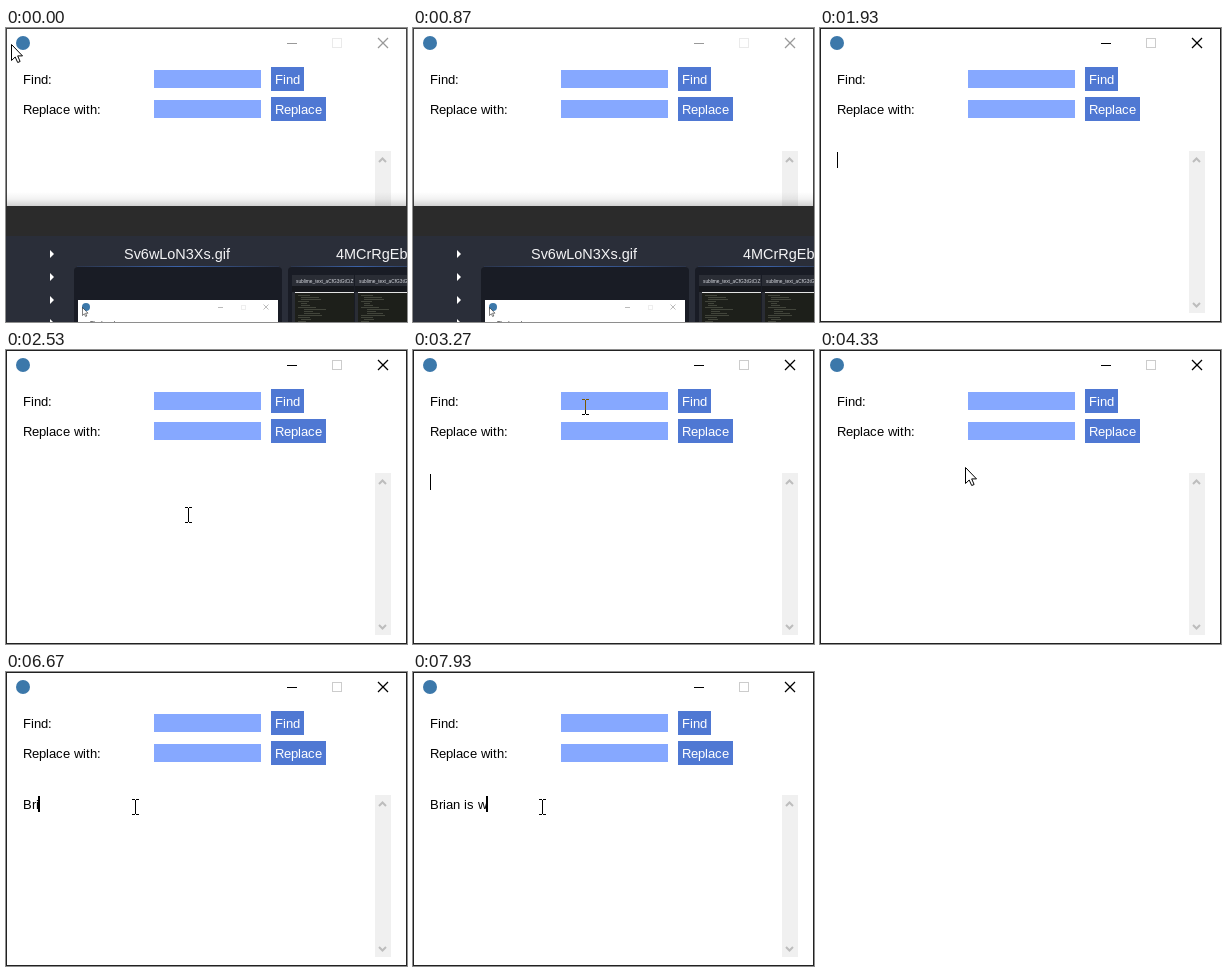
These frames come from a looping animation (401 px wide and 294 px high, 8000 ms). An HTML page with a canvas:

```html
<!DOCTYPE html>
<html lang="en">
<head>
<meta charset="utf-8">
<title>Find and replace</title>
<style>
html, body { margin: 0; width: 100%; height: 100%; overflow: hidden; background: #fff; }
canvas { display: block; width: 401px; height: 294px; }
</style>
</head>
<body>
<canvas id="stage" width="401" height="294"></canvas>
<script>
const W = 401, H = 294, LOOP = 8000, STEP = 1000 / 15;
const c = document.getElementById('stage').getContext('2d');
const SANS = '"Liberation Sans", Arial, sans-serif';

// All times in ms.
const FOCUS = 1800, RAISE = 1930, CLICK = 4710;
const BLINK = { period: 920, on: 633 };

// Keys come in bursts with an even gap.
const BURSTS = [
  { keys: 'Bria', at: 6370, gap: 100 },
  { keys: 'n ', at: 6865, gap: 66 },
  { keys: 'is ', at: 7399, gap: 133 },
  { keys: 'w', at: 7930, gap: 0 }
];

// Pointer strokes: start, bend and end points; "leaves" hides it afterwards.
const STROKES = [
  { at: 133, end: 267, from: [5, 16], via: [4, 19], to: [3, 22], leaves: true },
  { at: 533, end: 800, from: [2, 93], via: [50, 184], to: [102, 276], leaves: true },
  { at: 2200, end: 2533, from: [377, 191], via: [215, 191], to: [182, 165] },
  { at: 2800, end: 3467, from: [182, 165], via: [212, 50], to: [136, 43] },
  { at: 3600, end: 3733, from: [136, 43], via: [137, 44], to: [138, 46] },
  { at: 4333, end: 4733, from: [145, 117], via: [255, 180], to: [129, 135] }
];

function box(x, y, w, h, color) {
  c.fillStyle = color;
  c.fillRect(x, y, w, h);
}

function frame(x, y, w, h, color) {
  c.strokeStyle = color;
  c.lineWidth = 1;
  c.strokeRect(x + 0.5, y + 0.5, w - 1, h - 1);
}

function line(points, color, width = 1) {
  c.beginPath();
  points.forEach(([x, y], i) => i ? c.lineTo(x, y) : c.moveTo(x, y));
  c.strokeStyle = color;
  c.lineWidth = width;
  c.stroke();
}

function fade(x0, y0, x1, y1, ...colors) {
  const g = c.createLinearGradient(x0, y0, x1, y1);
  colors.forEach((color, i) => g.addColorStop(i / (colors.length - 1), color));
  return g;
}

function dot(x, y, r) {
  c.beginPath();
  c.arc(x, y, r, 0, Math.PI * 2);
  c.fillStyle = '#3c78aa';
  c.fill();
}

function text(s, x, y, size, color) {
  c.font = size + 'px ' + SANS;
  c.fillStyle = color;
  c.fillText(s, x, y);
}

// Interface text sits on whole-pixel advances; returns the end position.
function label(s, x, y, color = '#000') {
  c.font = '13px ' + SANS;
  c.fillStyle = color;
  for (const ch of s) {
    c.fillText(ch, x, y);
    x += Math.round(c.measureText(ch).width + 0.01);
  }
  return x;
}

function cross(x, y, r, color, width) {
  line([[x - r, y - r], [x + r, y + r]], color, width);
  line([[x + r, y - r], [x - r, y + r]], color, width);
}

function chevron(x, y, dir) {
  line([[x - 3.5, y + 2 * dir], [x, y - 1.5 * dir], [x + 3.5, y + 2 * dir]], '#bdbdbd', 2);
}

function field(name, button, y, width) {
  label(name, 17, y + 17);
  box(148, y + 3, 107, 18, '#86a8ff');
  box(265, y, width, 24, '#4f78d3');
  label(button, 269, y + 17, '#fff');
}

function titleBar(active) {
  const ink = active ? '#000' : '#999';
  dot(17, 15, 7);
  box(281, 15, 10, 1, ink);
  frame(326, 10, 10, 10, active ? '#ccc' : '#eaeaea');
  cross(377, 15, 5, ink, 1.3);
}

function typed(t) {
  return BURSTS.map(({ keys, at, gap }) =>
    [...keys].filter((_, i) => t >= at + i * gap).join('')).join('');
}

function caretOn(t) {
  if (t < FOCUS - 5) return false;
  const since = t - (t < CLICK ? FOCUS + 20 : CLICK);
  return since % BLINK.period < BLINK.on;
}

function app(t) {
  box(0, 0, W, H, '#fff');
  titleBar(t >= FOCUS - 5);
  field('Find:', 'Find', 39, 33);
  field('Replace with:', 'Replace', 69, 55);
  box(369, 123, 16, 162, '#f0f0f0');
  chevron(376.5, 132, 1);
  chevron(376.5, 277, -1);

  const end = label(typed(t), 17, 137);
  if (caretOn(t)) {
    const left = Math.max(17, end - 1);
    box(left, 124, end + 1 - left, 16, '#000');
  }
  frame(0, 0, W, H, t < FOCUS ? '#444' : '#222');
}

function card(x, w) {
  c.beginPath();
  c.roundRect(x, 239, w, 70, 4);
  c.fillStyle = '#191c25';
  c.fill();
  box(x + 3, 238, w - 6, 1, fade(x, 0, x + w, 0, '#2b3347', '#3b62a8', '#2b3347'));
}

function editor(x) {
  box(x, 247, 62, 47, '#2a2d35');
  text('sublime_text_aCfG3tGtCiZ', x + 4, 254.5, 4.8, '#d8dae0');
  box(x, 258, 62, 6, '#16181d');
  box(x + 3, 264, 59, 1, '#e4e4e4');
  box(x + 3, 265, 59, 29, '#1d1f1a');
  let seed = 7;
  for (let y = 267; y < H; y += 2) {
    seed = seed * 73 % 101;
    box(x + 6 + seed % 3 * 3, y, 6 + seed % 22, 1, '#42453b');
  }
}

function browser(t) {
  box(0, 164, W, 14, fade(0, 164, 0, 178, 'rgba(0,0,0,0)', 'rgba(0,0,0,.05)', 'rgba(0,0,0,.18)'));
  box(0, 178, W, 30, t < FOCUS - 5 ? '#2b2b2b' : t < FOCUS + 60 ? '#1c1c1c' : '#0c0c0c');
  box(0, 208, W, 86, '#2a2e39');
  for (let y = 226; y < 300; y += 23) {
    c.beginPath();
    c.moveTo(44, y - 4);
    c.lineTo(48, y);
    c.lineTo(44, y + 4);
    c.fillStyle = '#fff';
    c.fill();
  }
  text('Sv6wLoN3Xs.gif', 118, 231, 14.45, '#f4f4f6');
  text('4MCrRgEb', 330, 231, 14.45, '#f4f4f6');

  card(68, 208);
  box(72, 272, 200, 22, '#fff');
  dot(80, 279, 4);
  box(212, 279, 5, 1, '#bbb');
  frame(235, 277, 5, 5, '#eee');
  cross(260, 279, 2.5, '#bbb');
  text('Find and up', 84, 298, 6.5, '#222');
  arrow(76, 279, 0.5);

  card(282, 140);
  editor(286);
  editor(349);
}

function arrow(x, y, scale = 1) {
  c.save();
  c.translate(x + 0.5, y + 0.5);
  c.scale(scale, scale);
  c.beginPath();
  c.moveTo(0, 0);
  for (const [px, py] of [[0, 16], [3.7, 12.5], [6.2, 18], [8.6, 17], [6.2, 11.4], [11, 11.4]]) c.lineTo(px, py);
  c.closePath();
  c.fillStyle = '#fff';
  c.fill();
  c.strokeStyle = '#000';
  c.lineWidth = 1;
  c.stroke();
  c.restore();
}

// Inverts what lies below it.
function beam(x, y) {
  c.save();
  c.globalCompositeOperation = 'difference';
  for (const top of [y - 8, y + 7]) {
    box(x - 3, top, 3, 1, '#fff');
    box(x + 1, top, 3, 1, '#fff');
  }
  box(x, y - 7, 1, 14, '#fff');
  c.restore();
}

function editable(x, y) {
  const inside = (l, t, w, h) => x >= l && x < l + w && y >= t && y < t + h;
  return inside(17, 123, 352, 162) || inside(148, 42, 107, 18) || inside(148, 72, 107, 18);
}

function pointer(t) {
  const s = STROKES.findLast(m => t >= m.at - 5) ?? STROKES[0];
  if (s.leaves && t > s.end + 5) return;
  const k = Math.min(1, Math.max(0, (t - s.at) / (s.end - s.at)));
  const [x, y] = s.from.map((p, i) =>
    Math.round(p * (1 - k) ** 2 + 2 * s.via[i] * k * (1 - k) + s.to[i] * k * k));
  (t >= RAISE && editable(x, y) ? beam : arrow)(x, y);
}

function draw(now) {
  const t = Math.floor((now % LOOP + 4) / STEP) * STEP;
  app(t);
  if (t < RAISE) browser(t);
  pointer(t);
}

let start;
function tick(now) {
  start ??= now;
  draw(now - start);
  requestAnimationFrame(tick);
}
draw(0);
requestAnimationFrame(tick);
</script>
</body>
</html>
```
